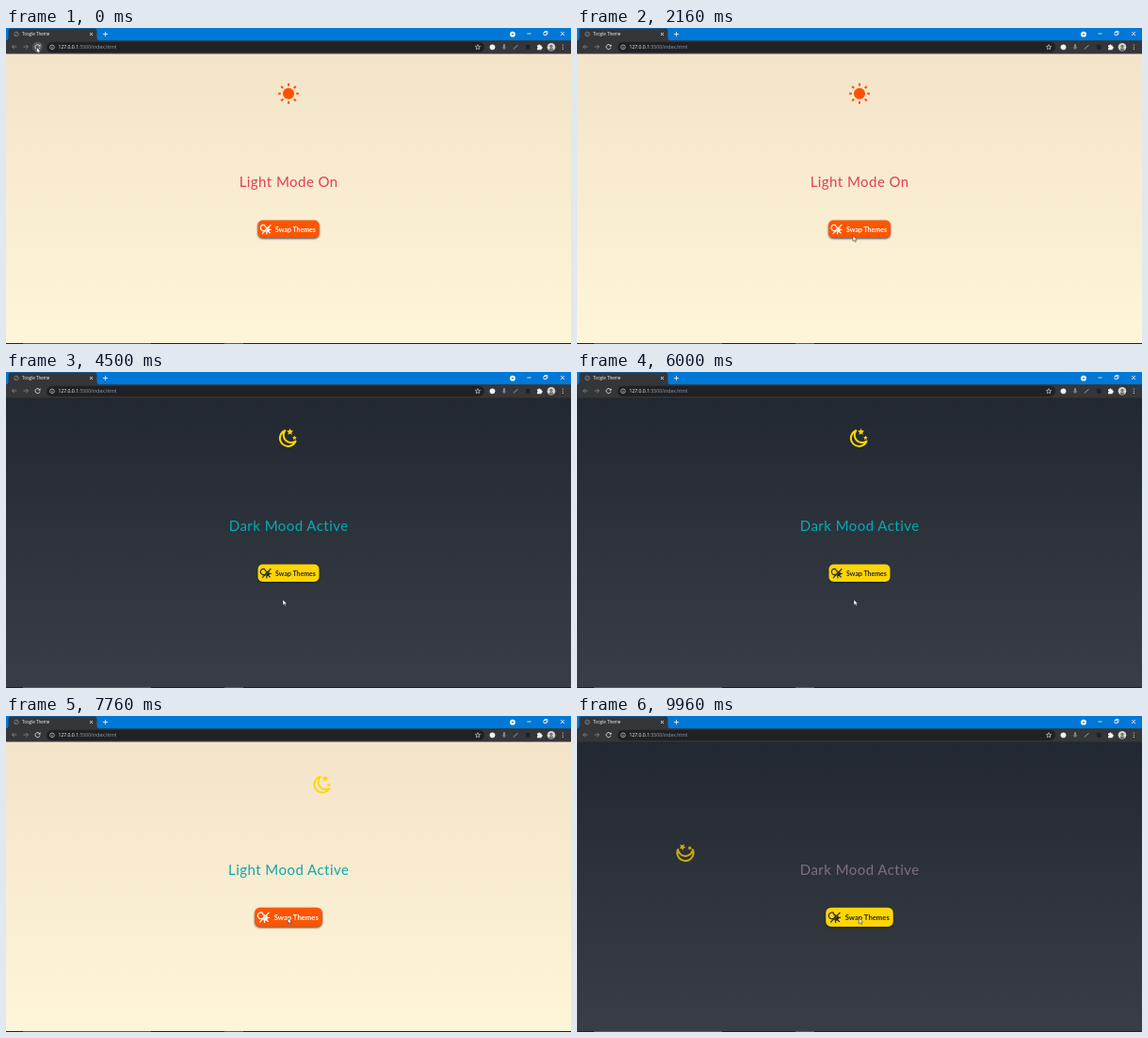
An HTML page for the animation above (10 s loop, 600 by 336 pixels).

```html
<!DOCTYPE html>
<html lang="en">
<head>
<meta charset="utf-8">
<title>Toogle Theme</title>
<style>
  html, body { margin: 0; width: 100%; height: 100%; overflow: hidden; }
  svg { display: block; width: 600px; height: 336px; }
  .ui { font-family: "Open Sans", sans-serif; }
  .page { font-family: Lato, sans-serif; text-anchor: middle; }
  .line { fill: none; stroke: #e8eaed; stroke-width: .9; }
  #button { --face: #ff5500; --ink: #fff; filter: drop-shadow(0 1px 1px rgba(0, 0, 20, .75)); }
  .dark #button { --face: #ffd600; --ink: #222831; filter: drop-shadow(0 1px 1px rgba(0, 0, 0, .4)); }
  #sky { fill: url(#day); }
  .dark #sky { fill: url(#night); }
</style>
</head>
<body>
<svg id="stage" viewBox="0 0 600 336">
  <defs>
    <linearGradient id="day" x2="0" y2="1">
      <stop stop-color="#f3e4c9"/><stop offset="1" stop-color="#fff5d8"/>
    </linearGradient>
    <linearGradient id="night" x2="0" y2="1">
      <stop stop-color="#222831"/><stop offset="1" stop-color="#393e46"/>
    </linearGradient>
  </defs>

  <g class="page">
    <rect id="sky" y="27" width="600" height="309"/>
    <g id="sun" fill="#ff5200">
      <circle cx="300" cy="69.7" r="6"/>
    </g>
    <g id="moon" fill="#ffd600">
      <path d="M296.3 62.3A8.6 8.6 0 1 0 307.5 73.5A8 8 0 0 1 296.3 62.3Z" fill="none" stroke="#ffd600" stroke-width="2" stroke-linejoin="round"/>
    </g>
    <text id="title" x="300.2" y="169" font-size="15" letter-spacing=".45"></text>
    <g id="button">
      <rect x="267.5" y="204.6" width="65" height="18.4" rx="5" fill="var(--face)"/>
      <g fill="none" stroke="var(--ink)" stroke-width="1.1" stroke-linecap="round">
        <path d="M281 209.5L272.3 218.6M274.6 209.6A3.2 3.2 0 0 0 277.2 212.2M274.6 209.6A3.1 3.1 0 1 0 276.4 213.3M279.5 214.6L281.4 214.4M278.7 216.6L280.4 218M276.7 217.3L276.9 219"/>
        <path d="M279.1 212.8L275.8 216.3A2.3 2.3 0 0 0 279.1 212.8Z" fill="var(--ink)" stroke-width=".5"/>
      </g>
      <text x="307.5" y="216.6" font-size="7" font-weight="700" fill="var(--ink)">Swap Themes</text>
    </g>
  </g>

  <g class="ui">
    <rect width="600" height="14" fill="#0078d7"/>
    <path d="M0 13.3Q2.5 13 2.5 10V3Q2.5 .5 5 .5H94Q96.500 .5 96.500 3V10Q96.500 13.3 99 13.3H600V27.4H0Z" fill="#35363a"/>
    <circle cx="11" cy="6.5" r="2.3" fill="none" stroke="#85878b" stroke-width=".8"/>
    <path d="M9.500 8L12.500 5" stroke="#85878b" stroke-width=".7"/>
    <text x="17" y="8.300" font-size="4.5" fill="#f1f3f4">Toogle Theme</text>
    <path class="line" d="M89 5L92 8M92 5L89 8M105.500 4V9M103 6.500H108"/>
    <circle cx="538" cy="6.700" r="2.900" fill="#fff"/>
    <path d="M536.600 6H539.400L538 7.800Z" fill="#0078d7"/>
    <path class="line" stroke-width=".7" d="M553.500 6H557.500M571 4.500H574V7.500H571ZM572 4.500V3.500H575V6.500H574M589 4L593 8M593 4L589 8"/>

    <path class="line" style="stroke:#7f8185" d="M11.500 20H6.500M8.800 17.700L6.500 20L8.800 22.300M18.500 20H23.500M21.200 17.700L23.500 20L21.200 22.300"/>
    <circle id="halo" cx="33.500" cy="20" r="5.500" fill="#535458"/>
    <path class="line" d="M35.600 18.700A2.500 2.500 0 1 0 36 20.600"/>
    <path d="M36.500 17.200V19.600H34.100Z" fill="#e8eaed"/>
    <rect x="43" y="14.700" width="465" height="11.400" rx="5.700" fill="#202124"/>
    <circle class="line" cx="49" cy="20.300" r="2.300" style="stroke-width:.6"/>
    <path class="line" d="M49 20V21.600M49 18.800V19.400" style="stroke-width:.6"/>
    <text x="55.500" y="22.200" font-size="5.1" fill="#f1f3f4">127.0.0.1<tspan fill="#9aa0a6">:5500/index.html</tspan></text>
    <g id="star" fill="none" stroke="#e8eaed" stroke-width=".6"></g>
    <circle cx="516.500" cy="20.300" r="2.900" fill="#f1f3f4"/>
    <path d="M529 17.800V20.500" stroke="#a4a6aa" stroke-width="1.500" stroke-linecap="round"/>
    <path d="M527.300 20.300A1.700 1.700 0 0 0 530.700 20.300M529 22V23" fill="none" stroke="#a4a6aa" stroke-width=".6"/>
    <path d="M539 22.500L543.300 18.200" stroke="#b4b6ba" stroke-width=".9"/>
    <rect x="552" y="17.800" width="4.500" height="4.800" fill="#202124"/>
    <path d="M564 18.500H565.300A1.100 1.100 0 0 1 567.500 18.500H568.700V19.800A1.100 1.100 0 0 1 568.700 22V23.200H564V21.600A.8 .8 0 0 0 564 20Z" fill="#f1f3f4"/>
    <circle cx="579" cy="20.200" r="4.300" fill="#d4d2cd"/>
    <path d="M576.500 23.600Q576.500 21.300 579 21.300T581.500 23.600Q579 25.300 576.500 23.600Z" fill="#77736c"/>
    <circle cx="579" cy="19.400" r="1.600" fill="#77736c"/>
    <path d="M591.300 18V18.010M591.300 20.200V20.210M591.300 22.400V22.410" stroke="#e8eaed" stroke-width="1.100" stroke-linecap="round"/>

    <rect y="335" width="600" height="1" fill="#20221f"/>
    <path d="M18 335.500H154M232 335.500H252" stroke="#55585a"/>
  </g>

  <path id="cursor" d="M0 0V6L1.500 4.800L2.500 6.900L3.400 6.500L2.500 4.400H4.300Z" fill="#fff" stroke="#222" stroke-width=".5"/>
</svg>

<script>
const LOOP = 10000, TURN = 1000, HOVER = 300;
const toggles = [2200, 7700, 9505];
const hovers = [[2130, 2720], [7430, LOOP]];
// time, x, y
const path = [
  [900, 32.5, 20.5], [2100, 293, 220.7], [2550, 293, 220.7], [2700, 293, 225],
  [3200, 294, 242], [6950, 294, 242], [7440, 299.3, 214.8]
];
const dayInk = [226, 62, 87], nightInk = [0, 173, 181];

const el = id => document.getElementById(id);
const [stage, sun, moon, title, button, halo, cursor] =
  ["stage", "sun", "moon", "title", "button", "halo", "cursor"].map(el);
const clamp = v => Math.min(1, Math.max(0, v));
const smooth = v => v * v * (3 - 2 * v);
const mix = (a, b, k) => a + (b - a) * k;

// CSS "ease": cubic-bezier(.25, .1, .25, 1)
function ease(x) {
  x = clamp(x);
  if (x === 0 || x === 1) return x;
  const curve = (u, a, b) => 3 * u * (1 - u) ** 2 * a + 3 * u * u * (1 - u) * b + u ** 3;
  let low = 0, high = 1;
  for (let i = 0; i < 24; i++) {
    const u = (low + high) / 2;
    if (curve(u, .25, .25) < x) low = u; else high = u;
  }
  return curve(low, .1, 1);
}

function add(parent, tag, attrs) {
  const node = document.createElementNS("http://www.w3.org/2000/svg", tag);
  for (const name in attrs) node.setAttribute(name, attrs[name]);
  parent.append(node);
}

function addStar(parent, x, y, r) {
  const points = Array.from({ length: 10 }, (_, i) => {
    const a = i * Math.PI / 5, d = i % 2 ? r * .45 : r;
    return [x + d * Math.sin(a), y - d * Math.cos(a)];
  });
  add(parent, "polygon", { points: points.join(" ") });
}

for (let a = 0; a < 360; a += 45)
  add(sun, "rect", { x: 299, y: 58.7, width: 2, height: 2.9, transform: `rotate(${a} 300 69.7)` });
addStar(moon, 301.6, 63.7, 3.8);
addStar(moon, 306.4, 70, 2.5);
addStar(el("star"), 501, 20.4, 2.8);

function cursorAt(t) {
  const next = path.findIndex(p => p[0] > t);
  if (next === 0) return path[0].slice(1);
  if (next < 0) return path[path.length - 1].slice(1);
  const a = path[next - 1], b = path[next];
  const k = smooth((t - a[0]) / (b[0] - a[0]));
  return [mix(a[1], b[1], k), mix(a[2], b[2], k)];
}

function place(body, angle, opacity) {
  body.setAttribute("transform", `rotate(${angle} 300 335.5)`);
  body.setAttribute("opacity", opacity);
}

function draw(t) {
  const count = toggles.filter(at => at <= t).length;
  const dark = count % 2 === 1;
  const k = count ? clamp((t - toggles[count - 1]) / TURN) : 1;
  const turn = ease(k);

  stage.classList.toggle("dark", dark);
  place(dark ? moon : sun, -180 * (1 - turn), turn);
  place(dark ? sun : moon, 180 * turn, 1 - turn);

  title.textContent = dark ? "Dark Mood Active" : count ? "Light Mood Active" : "Light Mode On";
  const night = dark ? k : 1 - k;
  title.setAttribute("fill", `rgb(${dayInk.map((c, i) => Math.round(mix(c, nightInk[i], night)))})`);

  const grow = hovers.reduce((sum, [enter, leave]) =>
    sum + ease((t - enter) / HOVER) - ease((t - leave) / HOVER), 0);
  button.setAttribute("transform", `translate(300 213.8) scale(${1 + .1 * grow}) translate(-300 -213.8)`);

  const [x, y] = cursorAt(t);
  cursor.setAttribute("transform", `translate(${x} ${y})`);
  halo.setAttribute("opacity", Math.hypot(x - 33.5, y - 20) < 6 ? 1 : 0);
}

function tick() {
  draw(performance.now() % LOOP);
  requestAnimationFrame(tick);
}
tick();
</script>
</body>
</html>
```
